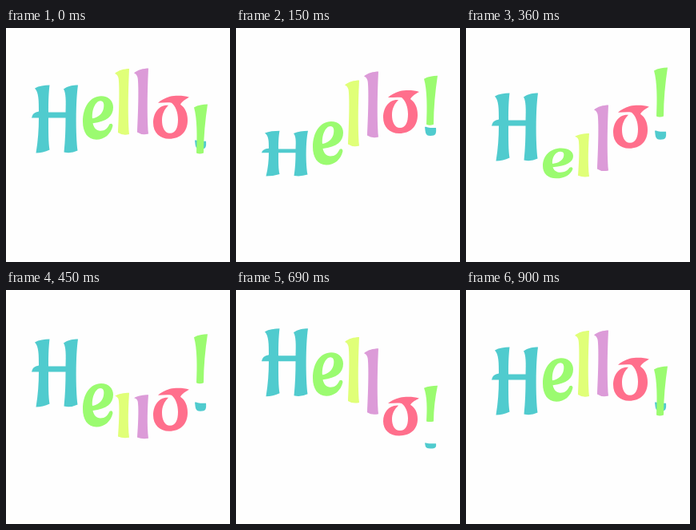
An HTML page with a canvas that plays this animation: 280 by 293 pixels, repeating every 0.93 s.

```html
<!DOCTYPE html>
<html lang="en">
<head>
<meta charset="utf-8">
<title>Hello!</title>
<style>
  html, body { margin: 0; width: 100%; height: 100%; overflow: hidden; background: #fefefe; }
  canvas { display: block; }
</style>
</head>
<body>
<canvas id="stage" width="280" height="293" role="img" aria-label="Hello!"></canvas>
<script>
const ctx = document.getElementById('stage').getContext('2d');
const LOOP = 930, STEP = 30, BOUNCE = 900;
const TEAL = '#50cbce', GREEN = '#9bfb70', YELLOW = '#e0ff78', PURPLE = '#dc9bd8', PINK = '#ff6f8c';

const L_SHAPE = 'M136 6C140 2 148 0 154 0C153 20 152 58 154 82Q146 84 140 80C141 60 142 30 141 16C141 10 139 7 136 6Z';

// peak: time of the highest point; base: bottom edge there; drop: total fall.
const letters = [
  { color: TEAL, peak: 645, base: 132.5, height: 85, drop: 56, path:
    'M36 4C41 1 48 0 54.5 0C53 12 53 25 53 34L74.5 34C75 20 75 10 72 5C77 1 84 0 90 0' +
    'C87 20 87 62 89.5 82Q81 86 72.5 84C74 70 74.5 55 74.5 41L53 41C53 60 53 72 54.5 81' +
    'Q46 85 37.5 85C40 70 41 55 41 41L32 41Q33 34 41 33C41 20 41 9 36 4Z' },
  { color: GREEN, peak: 750, base: 131.5, height: 54.5, drop: 65, path:
    'M133.5 37C131 48 123 54.5 113 54.5C102 54.5 96 45 96 32C96 14 105 0 119 0' +
    'C128 0 134 6 134 14C134 25 126 32 108.5 34C110 40 113 43.5 118 43.5C124 43.5 127 40 129.5 35Q133 33 133.5 37Z' +
    'M108 28C107 17 112 6 118 6C122 6 123 10 122 15C121 22 115 27 108 28Z' },
  { color: YELLOW, peak: 845, base: 133, height: 83, drop: 56, path: L_SHAPE },
  { color: PURPLE, peak: 940, base: 133, height: 83, drop: 56, path: L_SHAPE, shift: 24 },
  { color: PINK, peak: 1035, base: 132, height: 54, drop: 63, path:
    'M203 12C191 11 184 22 184 34C184 46 192 54 204 54C218 54 227 45 227 31' +
    'C227 22 224 15 218 11C220 7 225 4 229 2C222 -.5 212 -.5 205 1C198 3 193 6 190 9' +
    'C196 9 202 8 207 9C212 13 215 21 215 30C215 40 212 47 205 47C198 47 195 39 195 31C195 23 198 17 203 12Z' },
  { color: TEAL, peak: 1125, base: 133, height: 12, drop: 68, path:
    'M236 1C238 0 240 2 243 2L250 2C250.5 9 250 12 243 12C236 12 237 7 236 1Z' },
  { color: GREEN, peak: 1220, base: 111, height: 62, drop: 65, path:
    'M235 4C240 1 246 0 252 0C249 20 247 40 247 61Q242 63 238 61C239 40 239 18 235 4Z' }
];
for (const letter of letters) letter.outline = new Path2D(letter.path);

const SQUASH = [[0, 1], [330, 1], [370, .73], [400, .675], [450, .62]];

function tween(knots, x) {
  let i = 1;
  while (i < knots.length - 1 && x > knots[i][0]) i++;
  const [x0, y0] = knots[i - 1], [x1, y1] = knots[i];
  return y0 + (y1 - y0) * (x - x0) / (x1 - x0);
}

// Distance fallen at a given time before or after the peak.
function fall(gap, drop) {
  if (gap < 255) return .00037 * gap * gap;
  return tween([[255, 24], [275, 30], [300, 40], [325, 48], [450, drop]], gap);
}

function drawLetter(letter, time) {
  const since = (time - letter.peak + 2 * BOUNCE) % BOUNCE;
  const gap = Math.min(since, BOUNCE - since);
  const scale = tween(SQUASH, gap);
  const bottom = letter.base + fall(gap, letter.drop);
  ctx.save();
  ctx.translate(letter.shift || 0, bottom - letter.height * scale);
  ctx.scale(1, scale);
  ctx.fillStyle = letter.color;
  ctx.fill(letter.outline, 'evenodd');
  ctx.restore();
}

function draw() {
  const time = Math.floor(performance.now() % LOOP / STEP) * STEP;
  ctx.fillStyle = '#fefefe';
  ctx.fillRect(0, 0, 280, 293);
  for (const letter of letters) drawLetter(letter, time);
  requestAnimationFrame(draw);
}
draw();
</script>
</body>
</html>
```
